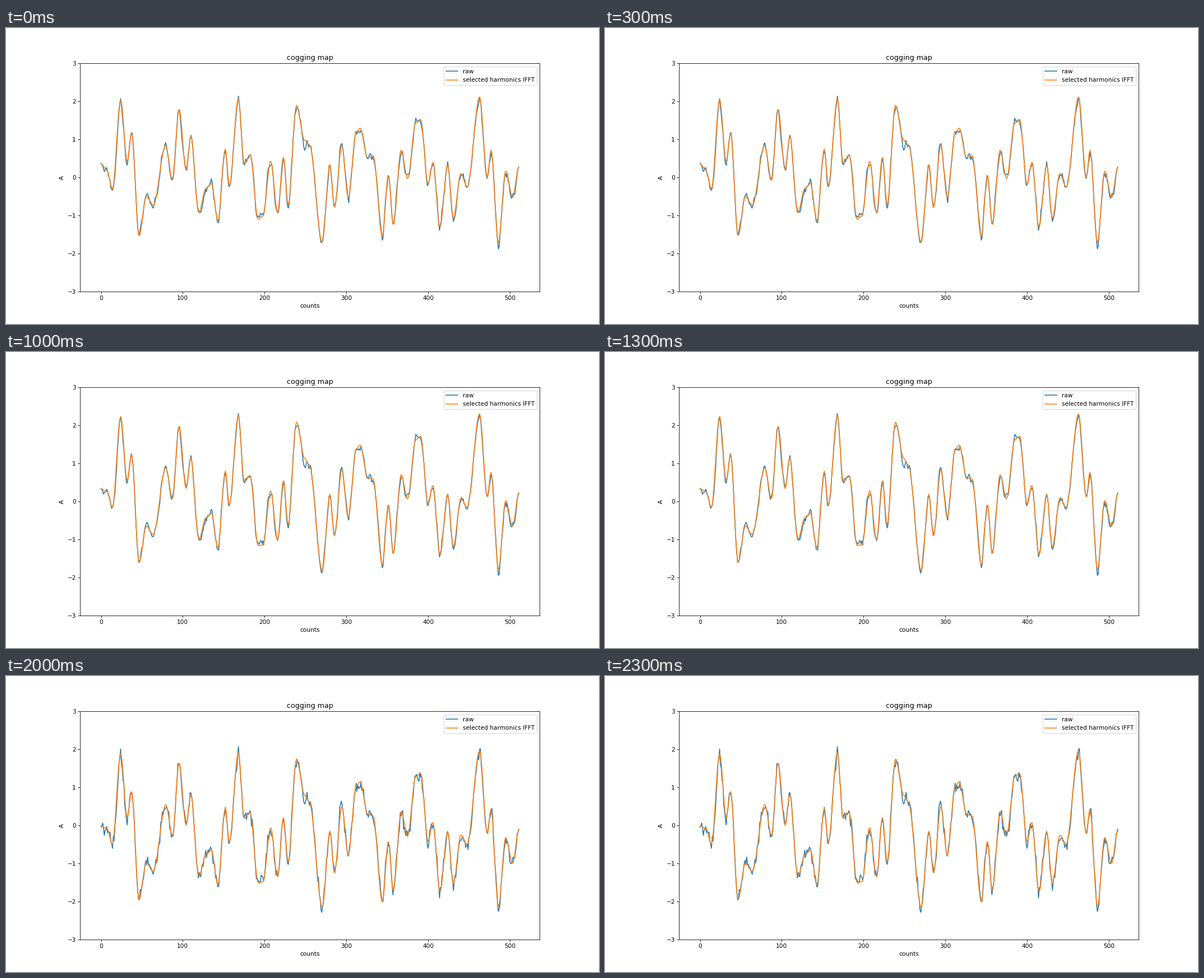
Animation of 1058 by 529 pixels, one loop 2.5 s. Source, as a matplotlib script:

```python
import matplotlib.pyplot as plt
import numpy as np
from matplotlib.animation import FuncAnimation

SIZE = 512
COUNTS = np.arange(SIZE)

# Turning points of the cogging current: (count, ampere)
TURNS = [
    (0, .36), (7, .2), (14, -.3), (24, 2.05), (32, .42), (37.5, 1.18),
    (46.5, -1.54), (55.5, -.5), (64, -.73), (79, .84), (87.5, -.08),
    (95.5, 1.8), (104, .2), (110, 1.08), (119.5, -.93), (128.5, -.28),
    (135, -.16), (143, -1.14), (152, .75), (157, -.22), (168, 2.08),
    (175, .38), (182.5, .6), (192, -1.1), (198, -1.02), (207.5, .43),
    (216, -.93), (223, .53), (229, -.72), (239, 1.9), (249, .98),
    (255, .86), (270.5, -1.71), (280, .34), (285.5, -.8), (294.5, .85),
    (302.5, -.55), (312, 1.18), (317, 1.3), (326, .52), (333, .57),
    (344, -1.56), (351.5, .07), (357.5, -1.25), (367, .72), (375, -.03),
    (385, 1.44), (391, 1.53), (400, -.18), (406, .4), (414.5, -1.32),
    (424, .34), (431, -1.08), (440, .1), (448, -.25), (463, 2.12),
    (472.5, 0), (477, .72), (486, -1.72), (495, .17), (503.5, -.53),
    (511, .28),
]

# Per map: offset, swing of the 7th harmonic, noise
MAPS = [(0, 0, .02), (.03, 0, .02), (.02, .17, .02), (.07, 0, .08), (-.32, .17, .07)]


def eased_curve(x, points):
    """Ease from each turning point to the next."""
    px, py = np.array(points).T
    index = np.arange(len(px))
    whole = np.interp(x, px, index)
    t = whole % 1
    return np.interp(whole - t + t * t * (3 - 2 * t), index, py)


def noise(amount, seed):
    return np.random.default_rng(seed).normal(0, amount, SIZE)


BASE = eased_curve(COUNTS, TURNS)
HARMONIC = np.cos(2 * np.pi * 7 * (COUNTS - 22) / SIZE)
RESIDUAL = np.convolve(noise(.12, 7), np.ones(3) / 3, "same")

fig, ax = plt.subplots(figsize=(14, 7), dpi=1058 / 14)
raw_line, = ax.plot(COUNTS, BASE, label="raw")
filtered_line, = ax.plot(COUNTS, BASE, label="selected harmonics IFFT")
ax.set(title="cogging map", xlabel="counts", ylabel="A", ylim=(-3, 3))
ax.legend(loc="upper right")


def update(frame):
    offset, swing, rough = MAPS[frame]
    filtered = BASE + offset + swing * HARMONIC
    filtered_line.set_ydata(filtered)
    raw_line.set_ydata(filtered + RESIDUAL + noise(rough, frame))
    return raw_line, filtered_line


animation = FuncAnimation(fig, update, frames=len(MAPS), interval=500, repeat=True)
plt.show()
```
